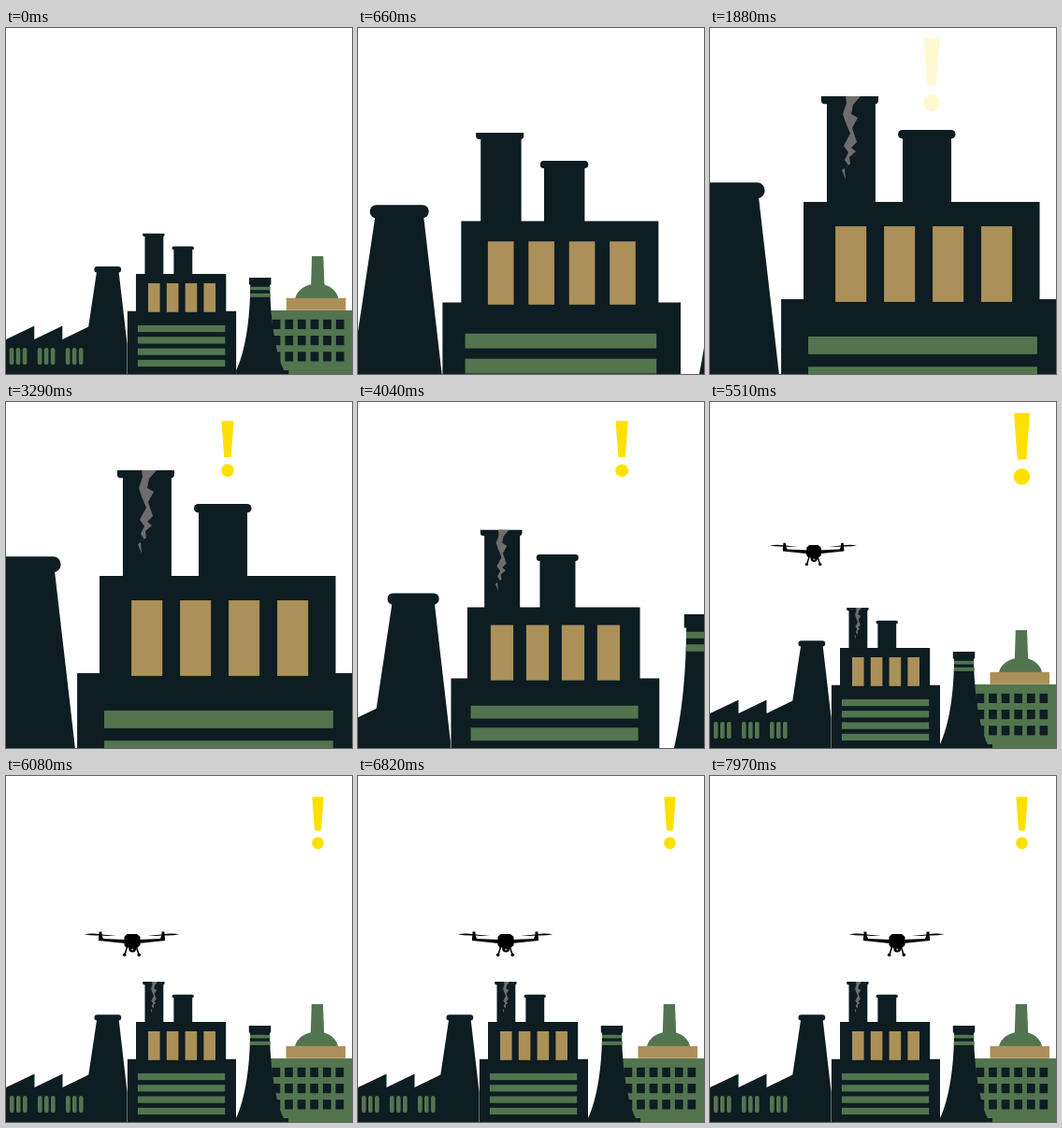
An HTML page that plays this animation: 370x370 px, repeating every 8 s.

```html
<!DOCTYPE html>
<html lang="en">
<head>
<meta charset="utf-8">
<title>Factory alert</title>
<style>
html, body { margin: 0; width: 100%; height: 100%; overflow: hidden; background: #fff; }
svg { display: block; width: 100%; height: 100%; }
.dark { fill: #0d1d21; }
.green { fill: #52754f; }
.tan { fill: #ab9059; }
</style>
</head>
<body>
<svg viewBox="0 0 370 370">
  <g id="city">
    <!-- office block with dome -->
    <g class="green">
      <rect x="283" y="302" width="87" height="68"/>
      <path d="M326.800 244H339L340.200 276H325.800Z"/>
      <path d="M309 289.500C310 281 320 273.500 332.500 273.500S354 281 355 289.500Z"/>
    </g>
    <rect class="tan" x="299.500" y="288.800" width="63.500" height="13"/>
    <g id="panes" class="dark"></g>

    <!-- cooling tower -->
    <path class="dark" d="M259.800 267H283.200V274.500H282C282.500 312 288 348 297 366H302V370H246V366C256 345 261 310 261 274.500H259.800Z"/>
    <path class="green" d="M261 276.800H282.200V280.400H261ZM261 283.800H282.500V287.700H260.800Z"/>

    <!-- workshop and wide chimney -->
    <path class="dark" d="M0 333L30.500 318.500V333L60.500 318.500V333L88.300 319.500L97.200 260H120.600L129.600 338V370H0Z"/>
    <rect class="dark" x="94.500" y="255.200" width="28.700" height="6.400" rx="3"/>
    <g id="slots" class="green"></g>

    <!-- main hall -->
    <g class="dark">
      <path d="M129.900 370V302.700H139V263.100H148.500V222H168.300V263.100H179.400V236H199.200V263.100H235.200V302.700H246V370Z"/>
      <path d="M146.200 220H169.500V221.500Q169.500 223.200 168 223.200H147.700Q146.200 223.200 146.200 221.500Z"/>
      <rect x="177.500" y="233.700" width="23.400" height="3.600" rx="1.700"/>
    </g>
    <g id="lights" class="tan"></g>
    <g id="bars" class="green"></g>

    <path id="crack" fill="#6d6d6d" transform="translate(100.900 192.200) scale(.381)"
      d="M145 73H161L153 82L151 92L158 96L152 107L157 122L151 128L156 132L149 138L150 145L144 150L145 162L141 152L148 147L144 141L148 133L143 126L150 113L145 101L142 92L146 80Z"/>
  </g>

  <g id="drone" stroke-linecap="round">
    <g id="rotors"></g>
    <path d="M-8 -8L-5 -11H5.500L9 -8V1L6 3.500H-6L-8 1Z"/>
    <circle cx=".7" cy="4.500" r="4"/>
    <circle cx=".7" cy="5.500" r="1.100" fill="#aaa"/>
  </g>

  <g id="alert" fill="#ffe000">
    <path d="M-8.700 -39.500H8.700L4.900 11.500H-4.900Z"/>
    <circle cy="30.300" r="9"/>
  </g>
</svg>
<script>
const LOOP = 8000, ZOOM = 2.625, PULSE = 900;
const $ = id => document.getElementById(id);
const city = $('city'), crack = $('crack'), drone = $('drone'), alertMark = $('alert');

// Fills a group with equal boxes, one for each pair of x and y.
function boxes(id, xs, ys, w, h, r = 0) {
  $(id).innerHTML = ys.flatMap(y => xs.map(x =>
    `<rect x="${x}" y="${y}" width="${w}" height="${h}" rx="${r}"/>`)).join('');
}
const row = (n, start, step) => Array.from({ length: n }, (_, i) => start + i * step);

boxes('panes', row(6, 284.5, 13.6), row(3, 311.8, 17.2), 8.7, 10.2);
boxes('slots', [4, 34, 64].flatMap(x => row(3, x, 7)), [342], 4.6, 18, 2);
boxes('lights', row(4, 152, 19.8), [273], 12.6, 30.8);
boxes('bars', [140.9], row(4, 317.9, 12.3), 93.3, 7.2);

const rotor = `
  <path d="M-51 -10.800Q-42 -12 -33.500 -10.800Q-25 -9.200 -16.500 -9.800Q-25 -8.500 -33.500 -9.500Q-43 -9 -51 -10.800Z"/>
  <path d="M-35 -13.500H-32V-10L-30.500 -6L-7 -5V-1L-35.500 -4V-7.500L-35 -10Z"/>
  <path d="M-5 3L-7.500 11" stroke="#000" stroke-width="1.600"/>
  <circle cx="-7.800" cy="11.300" r="1.800"/>`;
$('rotors').innerHTML = `${rotor}<g transform="scale(-1 1)">${rotor}</g>`;

const ramp = (t, from, to) => Math.min(1, Math.max(0, (t - from) / (to - from)));
const mix = (a, b, p) => a + (b - a) * p;

function draw(t) {
  const zoom = mix(1, ZOOM, ramp(t, 0, 900) - ramp(t, 3650, 4550));
  city.setAttribute('transform', `translate(163 310.5) scale(${zoom}) translate(-163 -310.5)`);
  crack.setAttribute('opacity', ramp(t, 1370, 1550));

  const beat = Math.min(4.5, Math.max(0, (t - 1870) / PULSE));
  const size = mix(.71, 1, Math.abs(1 - 2 * (beat % 1)));
  const alertX = mix(237, 333.5, ramp(t, 3620, 4520));
  alertMark.setAttribute('transform', `translate(${alertX} 50.2) scale(${size})`);
  alertMark.setAttribute('opacity', ramp(t, 1850, 2030));

  const entry = 1 - (1 - ramp(t, 4950, 5900)) ** 2.16;
  const droneX = mix(-30, 134.5, entry) + 23 * ramp(t, 6370, 6820) + 42 * ramp(t, 7610, 7970);
  drone.setAttribute('transform',
    `translate(${droneX} ${mix(64, 180, entry)}) scale(${mix(.46, 1, entry)})`);
  drone.setAttribute('visibility', t < 4950 ? 'hidden' : 'visible');
}

const start = performance.now();
function tick() {
  draw((performance.now() - start) % LOOP);
  requestAnimationFrame(tick);
}
tick();
</script>
</body>
</html>
```
